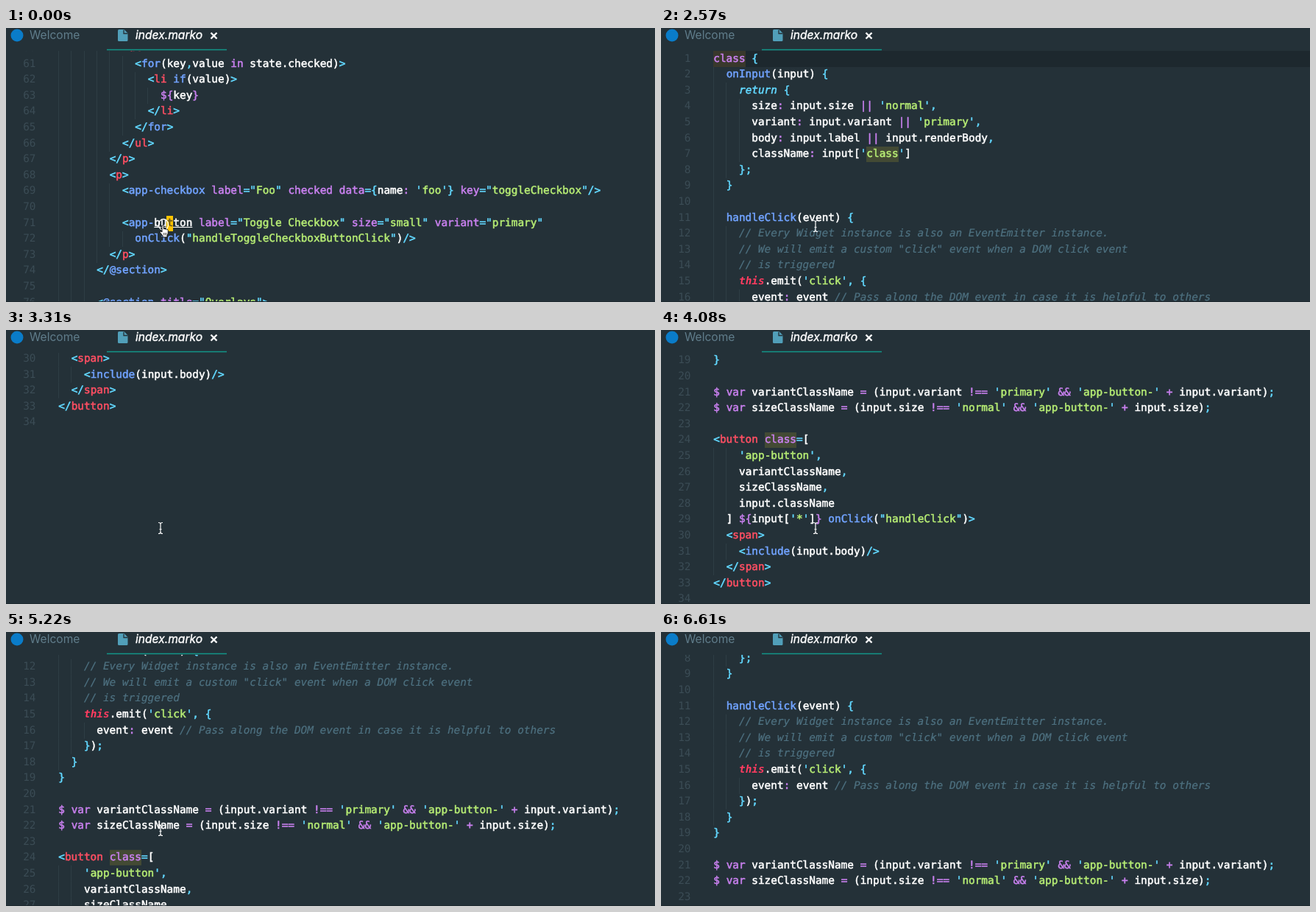
Recreate the animation shown at these times as an HTML page. Size 882 by 372 pixels, loop 6710 ms.

```html
<!DOCTYPE html>
<html lang="en">
<head>
<meta charset="utf-8">
<title>Editor: peek and jump to a component</title>
<style>
  html, body { margin: 0; width: 100%; height: 100%; overflow: hidden; background: #243138; }
  #stage { position: relative; width: 882px; height: 372px; overflow: hidden; background: #243138; }
  #stage div, #stage span, #stage svg { position: absolute; }
  #tabs { left: 0; top: 0; font: 15.6px/20px Inter, sans-serif; }
  #tabs span { top: 0; white-space: pre; }
  #editor { left: 0; top: 31px; width: 882px; height: 341px; overflow: hidden; }
  #edge { left: 0; top: 371px; width: 882px; height: 1px; background: #1f2a30; }
  .line, .num {
    height: 21.6px; white-space: pre; color: #fff;
    font: 14.4px/21.6px "DejaVu Sans Mono", monospace;
    text-rendering: geometricPrecision; font-variant-ligatures: none;
    -webkit-text-stroke: .55px;
  }
  .line span { top: 0; }
  .num { left: 0; width: 40.5px; text-align: right; color: #3b4c55; -webkit-text-stroke: 0; }
  .guide { width: 1px; height: 21.6px; background: #2e3d45; }
  .mark { height: 21.6px; background: #434a34; }
  .note { color: #4e7180; font-style: italic; -webkit-text-stroke: .2px; }
  .text { color: #b6ec74; }
  .punct { color: #62d8ff; }
  .tag { color: #ff4f63; }
  .self { color: #ff3c60; font-style: italic; font-weight: bold; -webkit-text-stroke: 0; }
  .flow { color: #62d8ff; font-style: italic; }
  .func { color: #71a3ff; }
  .key { color: #c980ef; }
  .link { text-decoration: underline; }
  #popup { left: 201px; top: 55px; width: 394px; height: 199px; background: #243138; border: 1px solid #33434b; }
  #band { left: 253px; top: 255px; width: 344px; height: 21px; background: #1e292f; }
  #word { left: 201px; top: 255px; width: 52px; height: 21px; background: #31464c; }
  #caret { width: 8.65px; height: 20.6px; background: #ffc400; }
  #caret .line { color: #6b5a1c; top: -.4px; }
</style>
</head>
<body>
<div id="stage">
  <div id="editor"></div>
  <div id="edge"></div>
  <div id="popup"></div>
  <svg id="tabShapes" width="310" height="31" style="left:0;top:0">
    <circle cx="15" cy="10" r="8.5" fill="#0a7cc9"/>
    <path d="M152 3.5q0-1.5 1.5-1.5h7l5 5v9.5q0 1.5-1.5 1.5h-10.5q-1.5 0-1.5-1.5z" fill="#519fb9"/>
    <path d="M160 2.5v5h5.5" fill="none" stroke="#243138" stroke-width="1.3"/>
    <path d="M278.5 6.5l8 8m0-8l-8 8" stroke="#fff" stroke-width="2.4"/>
    <path d="M137 29.5h163" stroke="#129588" stroke-width="1.4"/>
  </svg>
  <div id="tabs">
    <span style="left:32px;color:#607d8b">Welcome</span>
    <span style="left:176px;color:#fff;font-style:italic;-webkit-text-stroke:.4px">index.marko</span>
  </div>
  <svg id="ring" width="20" height="24" style="left:204px;top:255px">
    <ellipse cx="10" cy="12" rx="6.5" ry="7.5" fill="none" stroke="#fff" stroke-width="1.3"/>
  </svg>
  <svg id="hand" width="14" height="20" viewBox="0 0 14 20" style="left:0;top:0">
    <path d="M4 11V2.5q1.2-1.8 2.4 0V7q1-1 2 .3 1.2-.9 2 .4 1.4-.6 1.9.8V12q0 2-1.3 3.5V18H5v-2L1.2 11.5q-.2-2 1.5-1.3z"
      fill="#fff" stroke="#111" stroke-width="1"/>
    <path d="M6.5 12v3.5M8.3 12v3.5M10 12v3.5" stroke="#222" stroke-width=".7"/>
  </svg>
  <svg id="beam" width="10" height="18" style="left:204.5px;top:260px">
    <path d="M2 1.5q3 0 3 2v11q0 2-3 2M8 1.5q-3 0-3 2v11q0 2 3 2M3.5 10.5h3" fill="none" stroke="#fff" stroke-width="1.2"/>
  </svg>
</div>
<script>
const LOOP = 6710, CHAR = 8.669, ROW = 21.6, LEFT = 71.3, TEXT_DROP = .6;

const pageCode = `          <ul>
            <for(key,value in state.checked)>
              <li if(value)>
                \${key}
              </li>
            </for>
          </ul>
        </p>
        <p>
          <app-checkbox label="Foo" checked data={name: 'foo'} key="toggleCheckbox"/>

          <app-button label="Toggle Checkbox" size="small" variant="primary"
            onClick("handleToggleCheckboxButtonClick")/>
        </p>
      </@section>

      <@section title="Overlays">`.split('\n');

const buttonCode = `class {
  onInput(input) {
    return {
      size: input.size || 'normal',
      variant: input.variant || 'primary',
      body: input.label || input.renderBody,
      className: input['class']
    };
  }

  handleClick(event) {
    // Every Widget instance is also an EventEmitter instance.
    // We will emit a custom "click" event when a DOM click event
    // is triggered
    this.emit('click', {
      event: event // Pass along the DOM event in case it is helpful to others
    });
  }
}

$ var variantClassName = (input.variant !== 'primary' && 'app-button-' + input.variant);
$ var sizeClassName = (input.size !== 'normal' && 'app-button-' + input.size);

<button class=[
    'app-button',
    variantClassName,
    sizeClassName,
    input.className
  ] \${input['*']} onClick("handleClick")>
  <span>
    <include(input.body)/>
  </span>
</button>
`.split('\n');

const grammar = new RegExp([
  /(?<note>\/\/.*)/,
  /(?<text>'[^']*'|"[^"]*")/,
  /(?<link>(?<=<app-)button)/,
  /(?<tag>(?<=<\/?)(?:p|li|ul|span|button)\b)/,
  /(?<func>(?<=<\/?)(?:app-(?=b)|[\w@-]+)|(?<![.\w])\w+(?=\())/,
  /(?<self>\bthis\b)/,
  /(?<flow>\breturn\b)/,
  /(?<key>\b(?:class|var|in)\b|(?<![.\w])checked\b|\w+(?==)|\$\{?|(?<=[\]\w])\}|\|\||&&|!==|[+:]|(?<= )=(?= ))/,
  /(?<punct>[<>\/{};,=]+)/
].map(r => r.source).join('|'), 'g');

const $ = id => document.getElementById(id);

function add(parent, className, style = {}, text = '', tag = 'div') {
  const el = document.createElement(tag);
  el.className = className;
  el.textContent = text;
  for (const k in style) el.style[k] = typeof style[k] === 'number' ? style[k] + 'px' : style[k];
  parent.appendChild(el);
  return el;
}

function drawLine(parent, code, left, top) {
  const line = add(parent, 'line', { left, top });
  const put = (kind, col, text) => text.trim() && add(line, kind, { left: col * CHAR }, text, 'span');
  const plain = (from, to) => {
    const text = code.slice(from, to), pad = text.length - text.trimStart().length;
    put('', from + pad, text.trimStart());
  };
  let end = 0;
  for (const m of code.matchAll(grammar)) {
    plain(end, m.index);
    const kind = Object.keys(m.groups).find(k => m.groups[k]), word = m[0];
    end = m.index + word.length;
    if (kind === 'text') {
      put('punct', m.index, word[0]);
      put('text', m.index + 1, word.slice(1, -1));
      put('punct', end - 1, word[0]);
    } else put(kind, m.index, word);
  }
  plain(end);
}

const rowTop = n => (n - 1) * ROW;
const level = code => Math.floor(code.search(/\S|$/) / 2);

function drawFile(lines, first) {
  const file = add($('editor'), 'file', { left: 0, top: 0 });
  const marks = add(file, 'marks', { left: 0, top: 0 });
  lines.forEach((code, i) => {
    const top = rowTop(first + i);
    const depth = code ? level(code) : Math.min(level(lines[i - 1] || ''), level(lines[i + 1] || ''));
    for (let d = 0; d < depth; d++) add(file, 'guide', { left: 71 + d * 2 * CHAR, top });
    add(file, 'num', { top: top + TEXT_DROP }, first + i);
    drawLine(file, code, LEFT, top + TEXT_DROP);
  });
  return { file, marks };
}

const page = drawFile(pageCode, 60);
const button = drawFile(buttonCode, 1);

// Row highlight and the matching occurrences of "class"
const rowMark = add(button.marks, 'mark', { left: 71, top: 0, width: 811, background: '#1d282e' });
const wordMarks = [[1, 0], [7, 24], [24, 8]].map(([n, col]) =>
  add(button.marks, 'mark', { left: LEFT + col * CHAR, top: rowTop(n), width: 5 * CHAR }));
wordMarks[0].style.background = '#39382c';

const caret = add(page.file, '', { left: LEFT + 17 * CHAR - .5, top: rowTop(71) + 1 });
caret.id = 'caret';
add(caret, 'line', { left: .5 }, 't');

const PAGE_SCROLL = 1289;
const hover = add(page.marks, '', { left: 0, top: PAGE_SCROLL - 31 });
for (const id of ['band', 'word']) add(hover, '').id = id;
buttonCode.slice(0, 9).forEach((code, i) => drawLine($('popup'), code, 7, 5.6 + i * 21));

// Scroll runs: first jump, last jump, number of jumps, from, to, easing
const linear = p => p;
const easeOut = p => 1 - (1 - p) ** 2;
const easeInOut = p => (1 - Math.cos(Math.PI * p)) / 2;
const runs = [
  [2690, 3190, 10, 0, 480, easeInOut],
  [3250, 3310, 3, 480, 629.4, linear],
  [3340, 3450, 4, 629.4, 712.8, easeOut],
  [3600, 4080, 15, 712.8, 389, easeInOut],
  [4590, 5220, 12, 389, 232.2, linear],
  [5270, 5670, 8, 232.2, 157.2, easeOut]
];

function scrollAt(t) {
  let y = 0;
  for (const [start, end, jumps, from, to, ease] of runs) {
    if (t < start) break;
    const done = Math.min(jumps, 1 + Math.floor((t - start) / (end - start) * (jumps - 1) + 1e-6));
    y = from + (to - from) * ease(done / jumps);
  }
  return y;
}

const show = (el, on) => { el.style.visibility = on ? 'visible' : 'hidden'; };

function draw(t) {
  const onPage = t < 1800;
  page.file.style.display = onPage ? '' : 'none';
  button.file.style.display = onPage ? 'none' : '';
  page.file.style.transform = `translateY(${-PAGE_SCROLL}px)`;
  button.file.style.transform = `translateY(${-scrollAt(t)}px)`;

  const fade = t < 20 || t >= 1630 ? 0 : Math.min(1, (t + 20) / 200);
  $('popup').style.opacity = hover.style.opacity = fade;
  show(caret, t < 590 || t >= 1100);
  show($('ring'), t < 60);
  show($('hand'), onPage);
  $('hand').style.transform = t < 1570 ? 'translate(208px, 266px)' : 'translate(206px, 268px)';
  show($('beam'), !onPage && t < 5670);

  show(rowMark, t >= 1850);
  wordMarks.forEach(mark => show(mark, t >= 1940 && t < 6610));
}

const begin = performance.now();
function tick() {
  draw((performance.now() - begin) % LOOP);
  requestAnimationFrame(tick);
}
tick();
</script>
</body>
</html>
```
